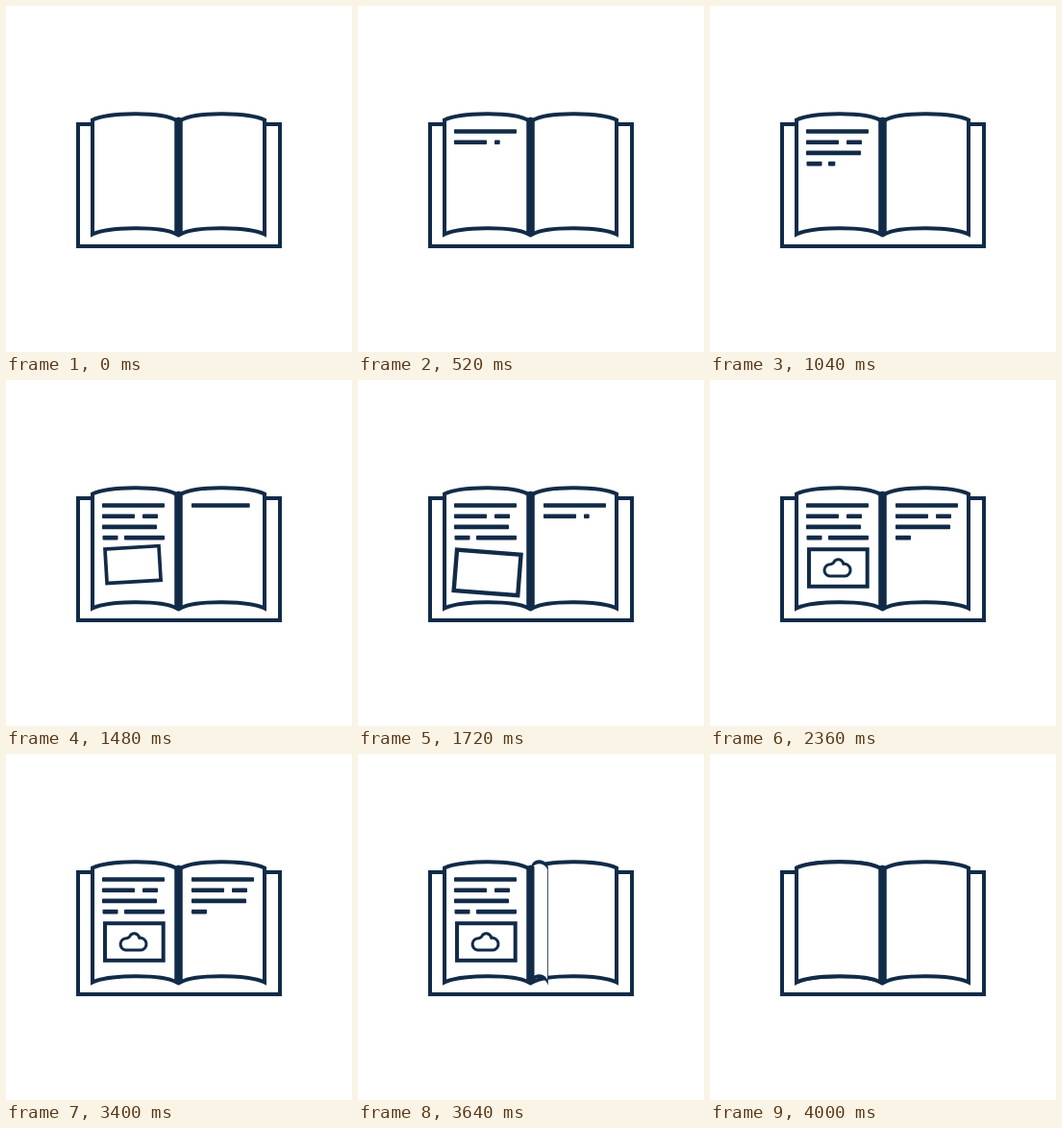
An HTML page for the animation above (4800 ms loop, 360 by 360 pixels).

```html
<!DOCTYPE html>
<html lang="en">
<head>
<meta charset="utf-8">
<title>Book</title>
<style>
  html, body { margin: 0; width: 100%; height: 100%; overflow: hidden; background: #fff; }
  svg { display: block; width: 100%; height: 100%; }
  .line { fill: #fff; stroke: #112b48; stroke-width: 4; }
  .ink { fill: #112b48; }
</style>
</head>
<body>
<svg viewBox="0 0 360 360">
  <defs>
    <!-- right-hand page, x measured from the spine -->
    <path id="page" class="line" d="M2 119C19 109 74 111 89.5 118.5V237.5C74 230 19 228.5 2 237.5Z"/>
  </defs>
  <rect class="line" x="75" y="123" width="210" height="127"/>
  <use href="#page" transform="translate(179.5 0) scale(-1 1)"/>
  <use href="#page" transform="translate(179.5 0)"/>
  <g id="left" class="ink"></g>
  <g id="right" class="ink"></g>
  <g id="frame"><rect class="line" x="103" y="176.2" width="60.7" height="38.6"/></g>
  <g id="cloud"><path class="line" style="stroke-width:3"
    d="M124.3 204A6.2 6.2 0 0 1 125.8 191.7C127.5 190.8 128.4 191 128.8 189.6C131 185.6 137 185.6 138.8 191.4A6.3 6.3 0 0 1 140.5 204Z"/></g>
  <use id="turn" href="#page"/>
  <path class="ink" d="M175.5 117L179.5 115.5 183.5 117V237.5L179.5 240 175.5 237.5Z"/>
</svg>
<script>
  const LOOP = 4800, STEP = 40, LINE_MS = 300, LINE_W = 65, SPINE = 179.5;
  const TURN_AT = 3400, TURN_MS = 600;
  const $ = id => document.getElementById(id);
  const clamp = v => Math.max(0, Math.min(1, v));
  const backOut = p => 1 + 2.70158 * (p - 1) ** 3 + 1.70158 * (p - 1) ** 2;

  // Each line holds [start, end] dashes
  const common = [[[0, 65]], [[0, 34], [42, 58]], [[0, 57]]];
  const bars = [];
  function addText(id, x, start, lines) {
    lines.forEach((dashes, i) => dashes.forEach(([from, to]) => {
      const el = document.createElementNS("http://www.w3.org/2000/svg", "rect");
      const attrs = { x: x + from, y: 128.2 + i * 11.2, height: 4.6, rx: 0.8 };
      for (const k in attrs) el.setAttribute(k, attrs[k]);
      $(id).append(el);
      bars.push({ el, from, to, start: start + i * LINE_MS });
    }));
  }
  addText("left", 100, 0, [...common, [[0.5, 16.5], [23, 65]]]);
  addText("right", 193, 1200, [...common, [[0, 16]]]);

  function popIn(id, t, start, ms, x, y, spin) {
    const p = clamp((t - start) / ms), s = backOut(p);
    $(id).style.display = p > 0 ? "" : "none";
    $(id).setAttribute("transform",
      `translate(${x} ${y}) rotate(${spin * (s - 1)}) scale(${s}) translate(${-x} ${-y})`);
  }

  function draw(t) {
    for (const b of bars) {
      const reach = clamp((t - b.start) / LINE_MS) * LINE_W;
      b.el.setAttribute("width", Math.max(0, Math.min(reach, b.to) - b.from));
    }
    popIn("frame", t, 1200, 900, 101, 174, 45);
    popIn("cloud", t, 1800, 600, 132, 195.5, 0);

    const turning = t > TURN_AT;
    const s = 1 - 2 * clamp((t - TURN_AT) / TURN_MS);
    $("right").style.display = turning ? "none" : "";
    $("turn").style.display = turning ? "" : "none";
    $("turn").setAttribute("transform", `translate(${SPINE} 0) scale(${s || 0.001} 1)`);
  }

  const begin = performance.now();
  function tick() {
    const t = (performance.now() - begin) % LOOP;
    draw(Math.floor(t / STEP) * STEP);
    requestAnimationFrame(tick);
  }
  tick();
</script>
</body>
</html>
```
